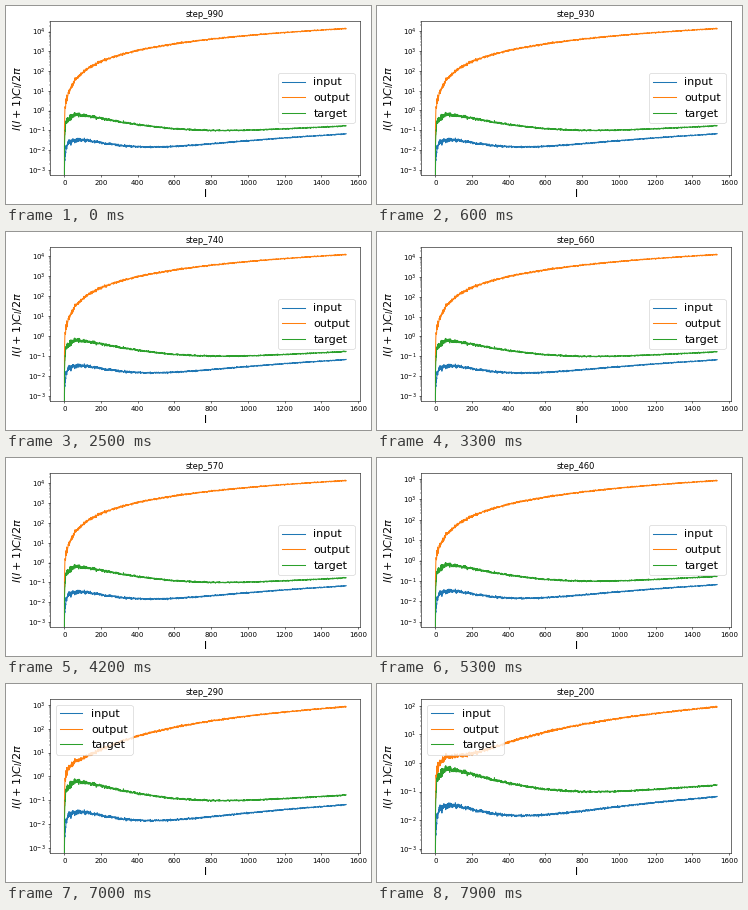
Recreate the animation shown at these times as a matplotlib script. Size 365 by 198 pixels, loop 8000 ms.

```python
import numpy as np
import matplotlib.pyplot as plt
from matplotlib.animation import FuncAnimation

W, H, DPI = 365, 198, 50
FRAMES, INTERVAL = 80, 100
L_MAX = 1535
FLOOR = 10 ** -2.905

ell = np.arange(L_MAX + 1)


def cosmic_scatter(seed):
    """Relative scatter that shrinks with the number of modes per multipole."""
    sigma = np.sqrt(2 / (2 * ell + 1))
    scatter = sigma * np.random.default_rng(seed).standard_normal(ell.size)
    return np.exp(np.clip(scatter, -0.45, 0.45))


def spectrum(gain, tail, slope, scatter):
    """A broad bump near l = 75 plus a power-law tail that ends at `tail`."""
    u = ell / 197
    bump = 4.95 * u / (1 + u) ** 3.6
    power = (gain * bump + tail * (ell / L_MAX) ** slope) * scatter
    power = np.maximum(power, FLOOR)
    power[0] = 0
    return power


def output_spectrum(step):
    undertrained = max(0, (570 - step) / 370)
    wobble = 0.04 * np.cos(2 * np.pi * (990 - step) / 380)
    tail = 10 ** (4.11 + wobble - 2.18 * undertrained ** 2.1)
    gain = np.interp(step, [200, 380], [2.6, 9])
    slope = 1.9 + 0.3 * undertrained
    return spectrum(gain, tail, slope, output_scatter)


def legend_place(step):
    if step >= 420:
        return "right"
    return "center" if step >= 340 else "upper left"


output_scatter = cosmic_scatter(5)

fig = plt.figure(figsize=(W / DPI, H / DPI), dpi=DPI, facecolor="white")
ax = fig.add_axes([44.2 / W, 29 / H, 310 / W, 154 / H])
ax.set_yscale("log", nonpositive="clip")
ax.set_xlim(-0.05 * L_MAX, 1.05 * L_MAX)
ax.set_xlabel("l", fontsize=16)
ax.set_ylabel(r"$l(l+1)C_l/2\pi$", fontsize=16)
title = ax.set_title("", fontsize=12)

ax.plot(ell, spectrum(0.056, 0.065, 2, cosmic_scatter(3)), label="input")
output_line, = ax.plot(ell, output_spectrum(990), label="output")
ax.plot(ell, spectrum(1, 0.153, 2, cosmic_scatter(8)), label="target")


def draw(i):
    step = 990 - 10 * i
    power = output_spectrum(step)
    output_line.set_ydata(power)
    margin = (power.max() / FLOOR) ** 0.05
    ax.set_ylim(FLOOR / margin, power.max() * margin)
    ax.legend(loc=legend_place(step), fontsize=16)
    title.set_text(f"step_{step}")
    return output_line, title


anim = FuncAnimation(fig, draw, frames=FRAMES, interval=INTERVAL,
                     repeat=True, repeat_delay=0, blit=False)
plt.show()
```
